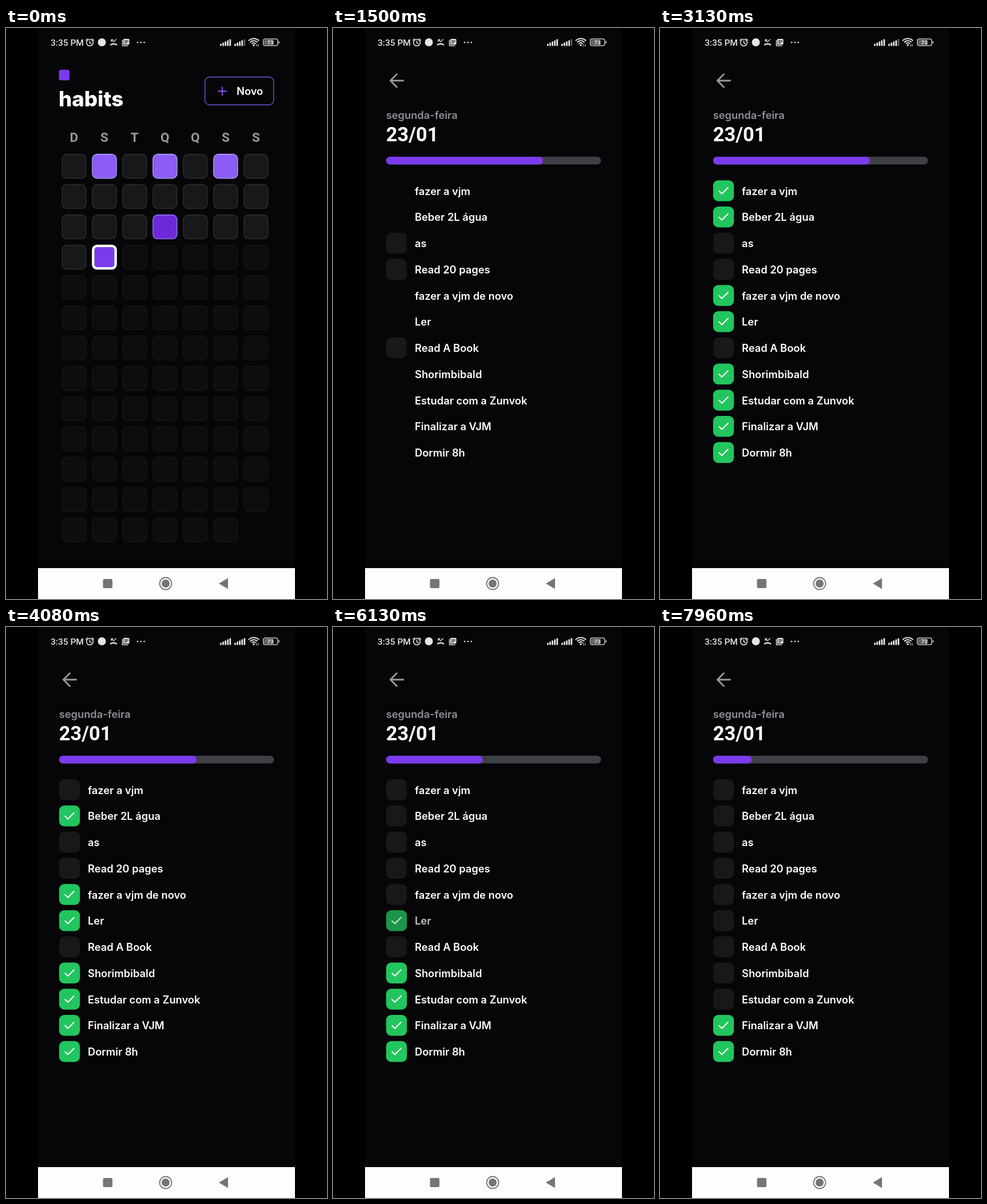
Animation, 561 px wide and 998 px high, one loop 8000 ms. Source, as an HTML page with a canvas:

```html
<!DOCTYPE html>
<html lang="pt">
<head>
<meta charset="utf-8">
<title>habits</title>
<style>
  html, body { margin: 0; width: 100%; height: 100%; overflow: hidden; background: #000; }
  canvas { display: block; width: 561px; height: 998px; }
</style>
</head>
<body>
<canvas id="stage"></canvas>
<script>
const W = 561, H = 998, LOOP = 8000;
const BG = '#060608', ZINC = '#18181b', GREEN = '#22c55e', VIOLET = '#7c3aed', STATUS = '#e4e4e4';
const INTER = 'Inter, sans-serif', ROBOTO = 'Roboto, sans-serif';

const canvas = document.getElementById('stage');
const ctx = canvas.getContext('2d');
const dpr = window.devicePixelRatio || 1;
canvas.width = W * dpr;
canvas.height = H * dpr;

// Timeline in ms
const OPEN = { press: 1170, release: 1380 };
const SCREEN_FADE = [1400, 1500];
const CHECKS_IN = 1524;
const ZOOM = 300, REPLY = 120;
const SIGNAL_FULL = 4000;

const habits = [
  { label: 'fazer a vjm', done: true, release: 3480 },
  { label: 'Beber 2L água', done: true, release: 4330 },
  { label: 'as' },
  { label: 'Read 20 pages' },
  { label: 'fazer a vjm de novo', done: true, release: 5190 },
  { label: 'Ler', done: true, release: 6050 },
  { label: 'Read A Book' },
  { label: 'Shorimbibald', done: true, release: 6885 },
  { label: 'Estudar com a Zunvok', done: true, release: 7525 },
  { label: 'Finalizar a VJM', done: true },
  { label: 'Dormir 8h', done: true },
];

const clamp = x => Math.min(1, Math.max(0, x));
const ease = x => (x = clamp(x), x < .5 ? 2 * x * x : 1 - 2 * (1 - x) ** 2);

function withAlpha(alpha, draw) {
  ctx.save();
  ctx.globalAlpha *= alpha;
  draw();
  ctx.restore();
}

function box(x, y, w, h, r, fill) {
  ctx.beginPath();
  ctx.roundRect(x, y, w, h, r);
  ctx.fillStyle = fill;
  ctx.fill();
}

function frame(x, y, w, h, r, color, line) {
  ctx.beginPath();
  ctx.roundRect(x + line / 2, y + line / 2, w - line, h - line, r - line / 2);
  ctx.strokeStyle = color;
  ctx.lineWidth = line;
  ctx.stroke();
}

function disc(x, y, r, fill) {
  ctx.beginPath();
  ctx.arc(x, y, r, 0, Math.PI * 2);
  ctx.fillStyle = fill;
  ctx.fill();
}

function arc(x, y, r, color, line, from = 0, to = Math.PI * 2) {
  ctx.beginPath();
  ctx.arc(x, y, r, from, to);
  ctx.strokeStyle = color;
  ctx.lineWidth = line;
  ctx.stroke();
}

function trace(d, color, line, x = 0, y = 0, scale = 1) {
  ctx.save();
  ctx.translate(x, y);
  ctx.scale(scale, scale);
  ctx.strokeStyle = color;
  ctx.lineWidth = line;
  ctx.lineCap = ctx.lineJoin = 'round';
  ctx.stroke(new Path2D(d));
  ctx.restore();
}

function text(str, x, y, font, color, align = 'left') {
  ctx.font = font;
  ctx.fillStyle = color;
  ctx.textAlign = align;
  ctx.fillText(str, x, y);
}

// Opacity of a touched element: dims to 0.7, then recovers
function touchOpacity(t, press, release) {
  return 1 - .3 * ease((t - press) / 150) * (1 - ease((t - release) / 250));
}

function touchDot(t, x, y, press, release) {
  if (t < press || t > release + 40) return;
  withAlpha(.42 * clamp((release + 40 - t) / 40), () => disc(x, y, 12.3, '#fff'));
}

function signal(x, lastColor) {
  for (let i = 0; i < 5; i++) {
    const h = 4 + 2 * i;
    box(x + 4.1 * i, 31.5 - h, 2.8, h, 1, i < 4 ? STATUS : lastColor);
  }
}

function statusBar(t) {
  text('3:35 PM', 78, 31, `500 15.5px ${ROBOTO}`, STATUS);

  arc(146.5, 25.5, 5.8, STATUS, 1.6);
  trace('M146.5 22.5V26L149 27.5M139.5 21.5L142.5 19M153.5 21.5L150.5 19', STATUS, 1.5);
  disc(167.5, 25, 7, STATUS);
  trace('M184 23.5V20.5H187M184.3 20.8L188 24L192.5 20', STATUS, 1.3);
  trace('M182.8 29.2Q188 26.2 193.2 29.2', STATUS, 2.4);
  box(205, 19, 10.5, 10, 1.5, STATUS);
  trace('M203.5 21.5V31H213', STATUS, 1.5);
  trace('M207 22H213.5M207 24.2H213.5M207 26.4H211', BG, 1);
  for (const x of [230, 235.8, 241.6]) disc(x, 25.3, 1.3, STATUS);

  signal(374, STATUS);
  signal(399, t < SIGNAL_FULL ? '#606060' : STATUS);
  for (const r of [5, 8.8, 12.6])
    arc(433, 31, r, STATUS, 2, -Math.PI * .76, -Math.PI * .24);
  disc(433, 30, 1.8, STATUS);
  trace('M437.5 32V28.5M440.5 28.5V32', STATUS, 1);

  frame(449, 18.5, 26.5, 13, 4, STATUS, 1.3);
  box(451, 20.5, 17, 9, 2, '#666');
  box(476.3, 23, 1.5, 4, 1, STATUS);
  text('73', 462, 28.7, `500 9.5px ${ROBOTO}`, '#fff', 'center');
}

function navBar() {
  const gray = '#757575';
  box(56, 944, 449, 54, 0, '#fdfdfd');
  box(169.5, 963, 16.5, 16, 2.5, gray);
  arc(279, 971, 10.5, gray, 1.8);
  disc(279, 971, 7, gray);
  ctx.fill(new Path2D('M372 971L388 961.5V980.5Z'));
}

function cell(x, y, fill, border, line = 2.2) {
  const size = 43.6, inner = size - 2 * line;
  box(x + line, y + line, inner, inner, 9 - line, fill);
  frame(x, y, size, size, 9, border, line);
}

function homeScreen(t) {
  box(92.5, 73, 18.5, 18.5, 4, VIOLET);
  text('habits', 92, 137, `800 36.6px ${INTER}`, '#fff');

  frame(347, 85, 121.4, 50, 9, '#8b5cf6', 1.2);
  trace('M371 110.5H385M378 103.5V117.5', '#8b5cf6', 1.8);
  text('Novo', 403, 117, `600 18.3px ${INTER}`, '#fff');

  [...'DSTQQSS'].forEach((day, i) =>
    text(day, 118.8 + 53 * i, 199, `700 22.5px ${ROBOTO}`, '#98989d', 'center'));

  const today = 22;
  for (let i = 0; i < 90; i++) {
    const x = 97.2 + 52.97 * (i % 7), y = 219.8 + 52.97 * Math.floor(i / 7);
    if (i === today) {
      withAlpha(touchOpacity(t, OPEN.press, OPEN.release), () => cell(x, y, VIOLET, '#fff', 4.4));
    } else if ([1, 3, 5].includes(i)) {
      cell(x, y, '#8b5cf6', '#a78bfa');
    } else if (i === 17) {
      cell(x, y, '#6d28d9', '#8b5cf6');
    } else {
      withAlpha(i < today ? 1 : .4, () => cell(x, y, ZINC, '#27272a'));
    }
  }
}

function checkScale(habit, i, t) {
  if (!habit.done) return 0;
  const grow = ease((t - CHECKS_IN - i) / ZOOM);
  const shrink = habit.release ? ease((t - habit.release - REPLY) / ZOOM) : 0;
  return grow * (1 - shrink);
}

function habitRow(habit, i, t) {
  const y = 284.5 + 45.75 * i;
  const scale = checkScale(habit, i, t);
  const growing = habit.done && t < CHECKS_IN + i + ZOOM;
  const alpha = habit.release ? touchOpacity(t, habit.release - 150, habit.release) : 1;
  withAlpha(alpha, () => {
    if (scale < 1 && !growing) box(92.8, y - 18.2, 36.4, 36.4, 9, ZINC);
    if (scale > 0) {
      ctx.save();
      ctx.translate(111, y);
      ctx.scale(scale, scale);
      box(-18.2, -18.2, 36.4, 36.4, 9, GREEN);
      trace('M8 -6L-3 5L-8 0', '#fff', 2, 0, .4, .98);
      ctx.restore();
    }
    text(habit.label, 143, y + 7, `600 18.3px ${INTER}`, '#fff');
  });
}

// Progress in whole percent; each change slides to its new value
function progress(t) {
  const percent = count => Math.round(100 * count / habits.length);
  let count = habits.filter(habit => habit.done).length;
  let value = percent(count);
  for (const { release } of habits) {
    if (!release) continue;
    value += (percent(count - 1) - percent(count)) * ease((t - release - REPLY) / ZOOM);
    count--;
  }
  return value / 100;
}

function dayScreen(t) {
  trace('M7.3 0H-7.3M0 7.3L-7.3 0L0 -7.3', '#98989d', 1.9, 111.5, 92, 1.53);
  text('segunda-feira', 92.7, 159, `600 18.3px ${INTER}`, '#8f8f95');
  text('23/01', 92.8, 198, `700 34.3px ${ROBOTO}`, '#fff');

  box(92.7, 225, 375.7, 13.5, 6.75, '#3f3f46');
  box(92.7, 225, 375.7 * progress(t), 13.5, 6.75, VIOLET);

  habits.forEach((habit, i) => habitRow(habit, i, t));
  habits.forEach(({ release }, i) => {
    if (release) touchDot(t, 125, 301.5 + 45.75 * i, release - 150, release);
  });
}

function draw(t) {
  ctx.setTransform(dpr, 0, 0, dpr, 0, 0);
  box(0, 0, W, H, 0, '#000');
  box(56, 0, 449, H, 0, BG);

  const shown = clamp((t - SCREEN_FADE[0]) / (SCREEN_FADE[1] - SCREEN_FADE[0]));
  if (shown < 1) withAlpha(1 - shown, () => homeScreen(t));
  if (shown > 0) withAlpha(shown, () => dayScreen(t));
  touchDot(t, 176.5, 401.5, OPEN.press, OPEN.release);

  statusBar(t);
  navBar();
}

const start = performance.now();
function tick() {
  draw((performance.now() - start) % LOOP);
  requestAnimationFrame(tick);
}
tick();
</script>
</body>
</html>
```
